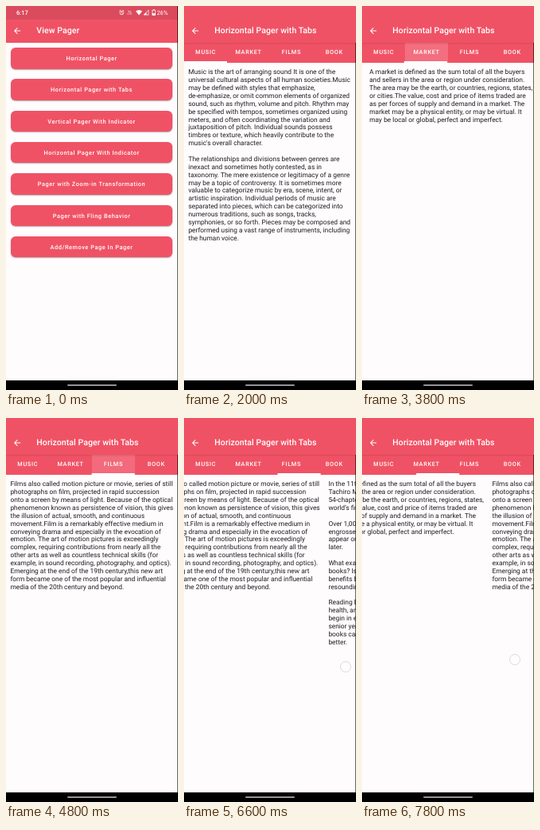
Animation of 216 by 480 pixels, one loop 8000 ms. Source, as an HTML page:

```html
<!DOCTYPE html>
<html lang="en">
<head>
<meta charset="utf-8">
<title>View Pager</title>
<style>
  html, body { margin: 0; width: 100%; height: 100%; overflow: hidden; background: #fffcfe; }
  #stage {
    position: relative; width: 216px; height: 480px; overflow: hidden;
    font-family: Roboto, sans-serif; color: #1f1d20; text-rendering: geometricPrecision;
    --red: #f05265;
  }
  #stage div, #stage svg { position: absolute; }
  .screen { inset: 0; background: #fffcfe; overflow: hidden; }
  .bar { left: 0; top: 0; width: 216px; height: 45.5px; background: var(--red); }
  #pager .bar { z-index: 1; box-shadow: 0 1px 2px rgba(0, 0, 0, .12); }
  .bar svg { left: 8.4px; top: 24.8px; }
  .title {
    left: 38.3px; top: 23px; line-height: 16px; white-space: pre;
    font-size: 10.5px; font-weight: 500; letter-spacing: .08px; color: #fff;
  }
  .button {
    left: 6px; width: 203px; height: 26.5px; border-radius: 6px; overflow: visible;
    background: var(--red); box-shadow: 0 1px 1.5px rgba(0, 0, 0, .3);
    color: #fff; font-size: 7.35px; font-weight: 500; letter-spacing: .56px;
    line-height: 27px; text-align: center; white-space: pre;
  }
  #press { inset: 0; border-radius: 6px; background: #fff; opacity: 0; }
  #tabs { left: 0; top: 45px; width: 216px; height: 25.5px; background: var(--red); }
  .tab {
    top: 0; width: 53.85px; height: 25.5px; line-height: 26px; text-align: center;
    color: #fff; font-size: 7.35px; font-weight: 500; letter-spacing: .66px; text-indent: .66px;
  }
  .ripple { inset: 0; background: #fff; opacity: 0; }
  #indicator { left: 0; top: 24px; width: 53.85px; height: 1.5px; background: #fff; }
  #pages { left: 0; top: 0; }
  .page { top: 79.3px; font-size: 8.4px; line-height: 9.88px; white-space: pre; }
  #touch {
    left: -7.4px; top: -7.4px; width: 12px; height: 12px; border-radius: 50%;
    border: 1px solid #dcd8da; background: rgba(255, 255, 255, .7);
  }
  #status { left: 0; top: 0; width: 216px; height: 16.5px; background: #da4b5e; }
  #status text { font-family: Roboto, sans-serif; fill: #fff; }
  #nav { left: 0; top: 468px; width: 216px; height: 12px; background: #000; }
  #nav div { left: 76.5px; top: 4.5px; width: 62.5px; height: 2px; border-radius: 1px; background: #979397; }
  #edge { left: 215px; top: 0; width: 1px; height: 480px; background: rgba(0, 0, 0, .6); }
</style>
</head>
<body>
<div id="stage">
  <div class="screen" id="menu">
    <div class="bar"><div class="title">View Pager</div></div>
  </div>
  <div class="screen" id="pager">
    <div id="pages"></div>
    <div class="bar"><div class="title">Horizontal Pager with Tabs</div></div>
    <div id="tabs"></div>
    <div id="touch"></div>
  </div>
  <svg id="status" viewBox="0 0 216 16.5" fill="none" stroke="#fff">
    <g stroke="none">
      <text x="12.9" y="11.2" font-size="7.6" font-weight="500">6:17</text>
      <text x="189.4" y="11.2" font-size="7.4">26%</text>
      <text x="153" y="7.6" font-size="3.6">Vo</text>
      <text x="152.6" y="11" font-size="3.6">LTE</text>
    </g>
    <g id="recorder" stroke-width=".8">
      <circle cx="36" cy="8.6" r="2.2"/>
      <path d="M36 5.2v1.2M36 10.8v1.2M32.6 8.6h1.2M38.2 8.6h1.2"/>
      <circle cx="36" cy="8.6" r=".9" fill="#fff" stroke="none"/>
    </g>
    <g stroke-width=".8">
      <circle cx="145.3" cy="8.5" r="2.3"/>
      <path d="M145.3 7v1.7l1.2.8M142.4 6.3l1.6-1.4M148.2 6.3l-1.6-1.4"/>
    </g>
    <path d="M163 6.6q4-3.4 8 0l-4 4.9z" fill="#fff" stroke="none"/>
    <path d="M173 11.1h6v-6z" stroke-width=".7"/>
    <path d="M173 11.1h3.4V7.7z" fill="#fff" stroke="none"/>
    <path d="M183.8 5.2h3.6v6.2h-3.6zM184.8 4.5h1.6" stroke-width=".8"/>
    <path d="M183.8 9.2h3.6v2.2h-3.6z" fill="#fff" stroke="none"/>
  </svg>
  <div id="nav"><div></div></div>
  <div id="edge"></div>
</div>
<script>
const LOOP = 8000, STEP = 200, WIDTH = 215.4, TAB = WIDTH / 4, SLOP = 9;
const OMEGA = Math.sqrt(1500) / 1000; // critically damped spring, per ms

const buttons = [
  'Horizontal Pager', 'Horizontal Pager with Tabs', 'Vertical Pager With Indicator',
  'Horizontal Pager With Indicator', 'Pager with Zoom-in Transformation',
  'Pager with Fling Behavior', 'Add/Remove Page In Pager'
];

const pages = {
  MUSIC: `Music is the art of arranging sound It is one of the
universal cultural aspects of all human societies.Music
may be defined with styles that emphasize,
de-emphasize, or omit common elements of organized
sound, such as rhythm, volume and pitch. Rhythm may
be specified with tempos, sometimes organized using
meters, and often coordinating the variation and
juxtaposition of pitch. Individual sounds possess
timbres or texture, which heavily contribute to the
music's overall character.

The relationships and divisions between genres are
inexact and sometimes hotly contested, as in
taxonomy. The mere existence or legitimacy of a genre
may be a topic of controversy. It is sometimes more
valuable to categorize music by era, scene, intent, or
artistic inspiration. Individual periods of music are
separated into pieces, which can be categorized into
numerous traditions, such as songs, tracks,
symphonies, or so forth. Pieces may be composed and
performed using a vast range of instruments, including
the human voice.`,
  MARKET: `A market is defined as the sum total of all the buyers
and sellers in the area or region under consideration.
The area may be the earth, or countries, regions, states,
or cities.The value, cost and price of items traded are
as per forces of supply and demand in a market. The
market may be a physical entity, or may be virtual. It
may be local or global, perfect and imperfect.`,
  FILMS: `Films also called motion picture or movie, series of still
photographs on film, projected in rapid succession
onto a screen by means of light. Because of the optical
phenomenon known as persistence of vision, this gives
the illusion of actual, smooth, and continuous
movement.Film is a remarkably effective medium in
conveying drama and especially in the evocation of
emotion. The art of motion pictures is exceedingly
complex, requiring contributions from nearly all the
other arts as well as countless technical skills (for
example, in sound recording, photography, and optics).
Emerging at the end of the 19th century,this new art
form became one of the most popular and influential
media of the 20th century and beyond.`,
  BOOK: `In the 11th century, a Japanese woman known as
Tachiro Mizunabe wrote “The Song of Renzo,” a
54-chapter story of courtly seduction believed to be the
world’s first novel.

Over 1,000 years later, people the world over are still
engrossed by novels — even in an era where stories
appear on handheld screens and disappear 24 hours
later.

What exactly do human beings get from reading
books? Is it just a matter of pleasure, or are there
benefits beyond enjoyment? The scientific answer is a
resounding “yes.”

Reading books benefits both your physical and mental
health, and those benefits can last a lifetime. They
begin in early childhood and continue through the
senior years. Here’s a brief explanation of how reading
books can change your brain — and your body — for the
better.`
};

const taps = [{ tab: 1, at: 3646 }, { tab: 2, at: 4500 }, { tab: 3, at: 5380 }];
const swipes = [
  { start: 6340, end: 6600, from: [18, 311], to: [203, 311] },
  { start: 7390, end: 7800, from: [25, 316], to: [192, 302] }
];

const $ = id => document.getElementById(id);
const clamp = x => Math.min(1, Math.max(0, x));
const mix = (a, b, k) => a + (b - a) * k;
const ramp = (t, a, b) => clamp((t - a) / (b - a));
const smooth = k => k * k * (3 - 2 * k);

function add(parent, className, text = '', style = {}) {
  const node = document.createElement('div');
  node.className = className;
  node.textContent = text;
  Object.assign(node.style, style);
  return parent.appendChild(node);
}

const arrow = `<svg width="12.2" height="12.2" viewBox="0 0 24 24" fill="#fff">
  <path d="M20 11H7.83l5.59-5.59L12 4l-8 8 8 8 1.41-1.41L7.83 13H20z"/></svg>`;
document.querySelectorAll('.bar').forEach(bar => bar.insertAdjacentHTML('beforeend', arrow));

buttons.forEach((label, i) => {
  const button = add($('menu'), 'button', label, { top: 52 + i * 39.3 + 'px' });
  if (i === 1) add(button, '').id = 'press';
});

const ripples = Object.entries(pages).map(([name, text], i) => {
  add($('pages'), 'page', text, { left: 5.4 + i * WIDTH + 'px' });
  return add(add($('tabs'), 'tab', name, { left: i * TAB + 'px' }), 'ripple');
});
add($('tabs'), '').id = 'indicator';

function spring(ms) {
  const s = Math.max(0, ms) * OMEGA;
  return 1 - (1 + s) * Math.exp(-s);
}

function finger(swipe, t) {
  const k = smooth(ramp(t, swipe.start, swipe.end));
  return swipe.from.map((v, i) => mix(v, swipe.to[i], k));
}

function dragged(swipe, t) {
  const pulled = Math.max(0, finger(swipe, t)[0] - swipe.from[0] - SLOP) / WIDTH;
  return mix(pulled, 1, spring(t - swipe.end));
}

function rippleAlpha(t, at) {
  return .16 * ramp(t, at - 90, at + 20) * (1 - ramp(t, at + 260, at + 620));
}

function draw(t) {
  $('recorder').style.opacity = t >= 200 ? 1 : 0;
  $('press').style.opacity = .2 * ramp(t, 1620, 1760);
  $('pager').style.opacity = ramp(t, 1740, 1900);

  const position = taps.reduce((sum, tap) => sum + spring(t - tap.at), 0)
    - swipes.reduce((sum, swipe) => sum + dragged(swipe, t), 0);
  $('pages').style.transform = `translateX(${-position * WIDTH}px)`;
  $('indicator').style.transform = `translateX(${position * TAB}px)`;
  taps.forEach(tap => ripples[tap.tab].style.opacity = rippleAlpha(t, tap.at));

  const active = swipes.find(swipe => t >= swipe.start && t <= swipe.end);
  $('touch').style.opacity = active ? 1 : 0;
  if (active) {
    const [x, y] = finger(active, t);
    $('touch').style.transform = `translate(${x}px, ${y}px)`;
  }
}

function tick() {
  const t = performance.now() % LOOP;
  draw(Math.floor(t / STEP) * STEP);
  requestAnimationFrame(tick);
}
tick();
</script>
</body>
</html>
```
